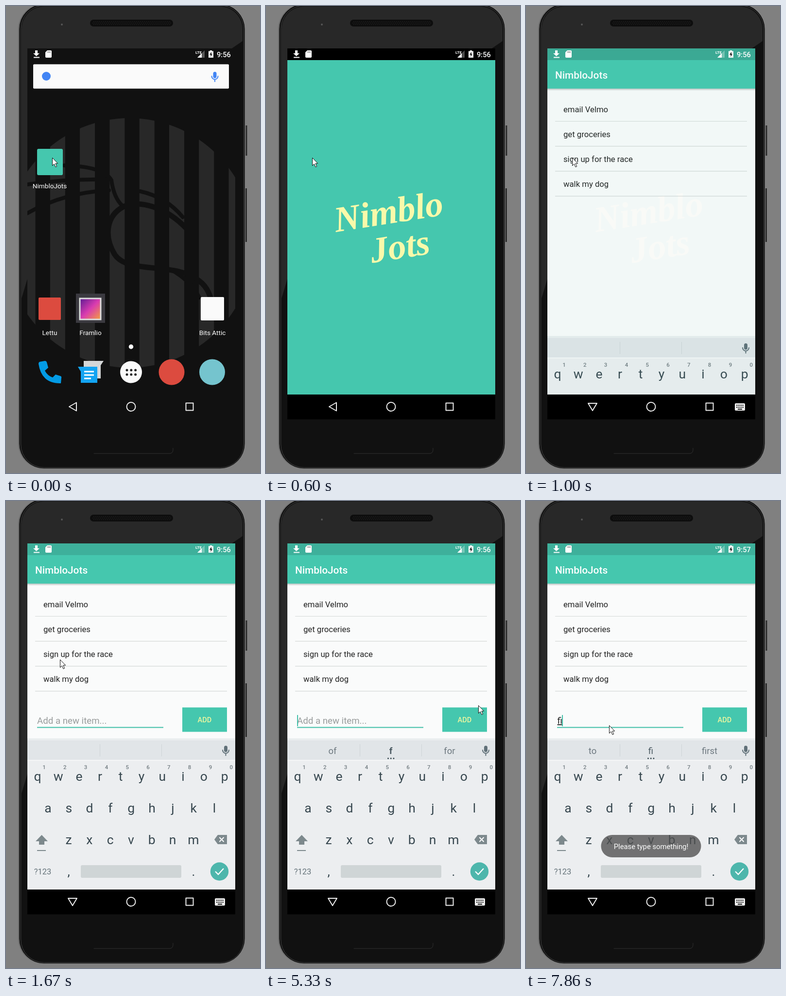
Recreate the animation shown at these times as an HTML page. Size 523 by 958 pixels, loop 7990 ms.

```html
<!DOCTYPE html>
<html lang="en">
<head>
<meta charset="utf-8">
<title>To-do app demo</title>
<style>
  html, body { margin: 0; width: 100%; height: 100%; overflow: hidden; background: #808080; }
  svg { display: block; width: 100vw; height: 100vh; font-family: Roboto, sans-serif; }
  .mid { text-anchor: middle; }
  .medium { font-weight: 500; }
  .line { fill: none; stroke-linecap: round; stroke-linejoin: round; }
  .label { font-size: 13.6px; fill: #fff; text-anchor: middle; }
  .item { font-size: 16.7px; fill: #222; }
  .key { font-size: 26.5px; fill: #37474f; text-anchor: middle; }
  .digit { font-size: 11.5px; font-weight: 500; fill: #737d82; text-anchor: middle; }
  .hint { font-size: 18.5px; fill: #6e7980; text-anchor: middle; }
  .script { font: italic bold 74px "Liberation Serif", serif; fill: #f9f9aa; text-anchor: middle; }
</style>
</head>
<body>
<svg viewBox="0 0 523 958">
  <defs>
    <clipPath id="screenClip"><path d="M44 87H472V848H44Z"/></clipPath>
    <clipPath id="contentClip"><path d="M44 87H472V797H44Z"/></clipPath>
    <clipPath id="discClip"><circle cx="254" cy="486" r="256"/></clipPath>
    <clipPath id="bodyClip"><rect x="32" y="1" width="455" height="944" rx="47"/></clipPath>
    <linearGradient id="shade" x2="0" y2="1">
      <stop stop-color="#000" stop-opacity=".22"/><stop offset="1" stop-color="#000" stop-opacity="0"/>
    </linearGradient>
    <linearGradient id="photo" x2="1" y2="1">
      <stop stop-color="#5b1a92"/><stop offset=".5" stop-color="#d93bb0"/><stop offset="1" stop-color="#f5a13a"/>
    </linearGradient>
    <g id="mic">
      <rect x="-3.5" y="-10" width="7" height="13" rx="3.5"/>
      <path class="line" d="M-6.5-1A6.5 6.5 0 0 0 6.5-1M0 6V10" stroke="currentColor" stroke-width="2"/>
    </g>
  </defs>

  <g id="phone">
    <rect x="25" y="-4" width="467" height="953" rx="52" fill="#696969"/>
    <rect x="28" y="-3" width="463" height="951" rx="50" fill="#111" stroke="#050505"/>
    <rect x="30.500" y="-1" width="459" height="948" rx="48" fill="none" stroke="#444"/>
    <g clip-path="url(#bodyClip)">
      <path d="M32 0H487V72L465 87H44V560L32 600Z" fill="#282828"/>
    </g>
    <path d="M495 245V307M494.500 374V484" stroke="#2b2b2b" stroke-width="3"/>
    <rect x="173" y="28" width="171" height="14" rx="7" fill="#0d0d0d"/>
    <path d="M180 32H338M178 35H340M180 38H338" stroke="#292929" stroke-dasharray="2 2"/>
    <circle cx="115" cy="38" r="2" fill="#555"/>
    <path class="line" d="M181 918H338Q345 917 344 907" stroke="#303030"/>
  </g>

  <g id="home" clip-path="url(#screenClip)">
    <path d="M44 87H472V848H44Z" fill="#111"/>
    <g clip-path="url(#discClip)">
      <g id="stripes" fill="#282828"></g>
      <g class="line" stroke="#111" stroke-width="11">
        <path d="M372 457C330 413 276 397 243 411C202 432 204 478 224 510C251 551 350 524 398 564Q422 582 425 620"/>
        <path d="M44 425Q118 383 212 378M44 366Q130 354 208 356M120 327Q200 329 217 357Q222 394 240 410M276 380Q330 392 364 433M340 541Q382 565 398 598" stroke-width="8"/>
      </g>
    </g>
    <rect x="56" y="119.500" width="403" height="50" rx="2" fill="#fafafa"/>
    <circle cx="83" cy="144" r="9" fill="#4285f4"/>
    <use href="#mic" x="430" y="145" fill="#4285f4" color="#4285f4"/>
    <rect x="64" y="293" width="53" height="54" rx="3" fill="#45c7ae"/>
    <rect x="67" y="598" width="46" height="46" rx="2" fill="#dc4b3f"/>
    <rect x="144" y="590" width="60" height="60" fill="#3b3a40"/>
    <rect x="152" y="600" width="43" height="43" fill="url(#photo)" stroke="#ddd" stroke-width="3"/>
    <rect x="401" y="597" width="48" height="48" rx="2" fill="#fafafa"/>
    <circle cx="341" cy="751" r="26.500" fill="#dc4b3f"/>
    <circle cx="424.500" cy="751" r="26.500" fill="#75c4ce"/>
    <path d="M69 730L80 728Q83 728 84 731L87 742L80 748Q85 758 96 762L102 756L112 759Q115 760 114 763L113 774Q73 775 67 734Q67 731 69 730Z" fill="#039be5"/>
    <path d="M160 728H201L195 737V764H160Z" fill="#d5d7d8"/>
    <path d="M148 740H188V773H154V750Z" fill="#13a4f2"/>
    <path d="M161 750H181M161 757H181M161 764H175" stroke="#fff" stroke-width="3"/>
    <circle cx="257.500" cy="751" r="22.500" fill="#fafafa"/>
    <path class="line" d="M249 747H267M249 756H267" stroke="#222" stroke-width="5" stroke-dasharray="0 8.800"/>
    <circle cx="257.500" cy="699" r="4.700" fill="#fff"/>
    <text class="label" x="90" y="374">NimbloJots</text>
    <text class="label" x="90" y="675">Lettu</text>
    <text class="label" x="174" y="675">Framlio</text>
    <text class="label" x="425" y="675">Bits Attic</text>
  </g>

  <g clip-path="url(#screenClip)">
    <g id="splash">
      <path d="M44 87H472V848H44Z"/>
      <path d="M44 111H472V797H44Z" fill="#45c7ae"/>
      <g class="script" transform="rotate(-9 258 460)">
        <text x="258" y="446">Nimblo</text>
        <text x="270" y="520">Jots</text>
      </g>
    </g>
  </g>

  <g id="app" clip-path="url(#contentClip)">
    <path d="M44 87H472V797H44Z" fill="#fafbfb"/>
    <path d="M44 87H472V111H44Z" fill="#3eb09b"/>
    <path d="M44 111H472V169.500H44Z" fill="#45c7ae"/>
    <path d="M44 169.500H472V174H44Z" fill="url(#shade)"/>
    <text class="medium" x="60" y="148.500" font-size="20.800" fill="#fff">NimbloJots</text>
    <g id="items"></g>
    <g id="entry">
      <text id="placeholder" x="64" y="457" font-size="18.700" fill="#999c9c">Add a new item...</text>
      <text id="typed" x="64.500" y="457" font-size="18.700" fill="#222" text-decoration="underline"></text>
      <path d="M64 464.500H324" stroke="#42bfa8" stroke-width="2"/>
      <rect id="caret" y="439" width="2" height="23" fill="#42bfa8"/>
      <path d="M363 423.500H455V473.500H363Z" fill="#45c7ae"/>
      <text class="mid medium" x="409" y="454" font-size="14.600" fill="#eef7a0">ADD</text>
    </g>
    <g id="keyboard">
      <path d="M44 487H472V491H44Z" fill="#e9edee"/>
      <path d="M44 490H472V797H44Z" fill="#eceef0"/>
      <path d="M44 491H472V531H44Z" fill="#e1e5e8"/>
      <path d="M193.500 499V524M320.500 499V524" stroke="#cdd3d6"/>
      <path d="M44 532H472" stroke="#f5f6f7" stroke-width="2"/>
      <g id="hints">
        <text class="hint" x="137" y="519"></text>
        <text class="hint" x="257" y="519" style="fill:#4b5a62"></text>
        <text class="hint" x="378" y="519"></text>
        <path id="dots" class="line" d="M251.500 528H264" stroke="#37474f" stroke-width="3" stroke-dasharray="0 5.700"/>
      </g>
      <use href="#mic" x="452.500" y="512" fill="#607078" color="#607078"/>
      <g id="keys"></g>
      <path d="M73.500 685L86 698H79V705H68V698H61ZM64 716H82V718H64Z" fill="#7d898d"/>
      <path d="M429 694.500L436 685H455V704H436Z" fill="#7d898d"/>
      <path class="line" d="M440 690.500L448 698.500M448 690.500L440 698.500" stroke="#fff" stroke-width="2"/>
      <text class="mid" x="75.500" y="766" font-size="16.500" fill="#66747b">?123</text>
      <rect x="154" y="747" width="207" height="26" rx="3" fill="#cfd5d6"/>
      <circle cx="439.500" cy="760" r="18.700" fill="#4db6ac"/>
      <path d="M431 760L437 766L448 754" fill="none" stroke="#fff" stroke-width="2.300"/>
    </g>
    <g id="toast">
      <rect x="154.500" y="685" width="206" height="46" rx="23" fill="#505050" fill-opacity=".82"/>
      <text class="mid" x="257.500" y="714" font-size="14.800" fill="#fff">Please type something!</text>
    </g>
  </g>

  <g id="statusIcons" fill="#fff">
    <path d="M60 91H65V97H69L62.500 103L56 97H60ZM57 104.500H69V106.500H57Z"/>
    <path d="M85 91H92Q94 91 94 93V104Q94 106 92 106H83Q81 106 81 104V95Z"/>
    <path d="M86 93V96M88.500 93V96M91 93V96" stroke="#555"/>
    <text x="390" y="98" font-size="8" font-weight="700">LTE</text>
    <path d="M409 91V106H394Z" opacity=".3"/>
    <path d="M403 97V106H394Z"/>
    <path d="M420 91H424V92.500H427V106H417V92.500H420Z"/>
    <path d="M423 94L419 100H421.500V104.500L425 98.500H423Z" fill="#222"/>
    <text id="clock" class="medium" x="434" y="104.500" font-size="14.600"></text>
  </g>

  <g class="line" stroke="#eee" stroke-width="2">
    <path id="back"/>
    <circle cx="257.500" cy="822" r="9"/>
    <path d="M370.500 814.500H385.500V829.500H370.500Z"/>
  </g>
  <g id="imeIcon">
    <rect x="430" y="815" width="21" height="15" rx="2" fill="#eee"/>
    <path d="M433 819H449M433 823H449" stroke="#111" stroke-width="2" stroke-dasharray="2 1.200"/>
    <path d="M436 827H445" stroke="#111" stroke-width="2"/>
  </g>
  <path id="pointer" d="M.5.5V16.500L4.200 13L7 19.300L9.600 18.200L6.900 12H11.700Z" fill="#fff" stroke="#111"/>
</svg>

<script>
const LOOP = 7990;
const ui = Object.fromEntries([...document.querySelectorAll('[id]')].map(el => [el.id, el]));

// Each track lists [start time, ...value]; a value holds until the next start.
const tracks = {
  pointer: [[0, 95, 311], [1670, 111, 325], [1790, 128, 345], [1910, 150, 372], [2030, 172, 398],
    [2150, 190, 418], [2270, 198, 428], [4800, 173, 424], [4940, 205, 420], [5060, 242, 445],
    [5210, 340, 425], [5330, 437, 419], [5480, 425, 441], [5610, 414, 430], [5760, 423, 431],
    [6060, 423, 440], [6450, 356, 452], [6600, 260, 458], [6720, 170, 461], [6870, 171, 460]],
  splash: [[0, 0, 60], [120, .25, 40], [240, .7, 14], [360, .96, 2], [480, 1, 0]],
  app: [[0, 0], [850, .757], [1000, .96], [1120, 1]],
  keyboard: [[0, 310], [1000, 190], [1120, 35], [1240, 0]],
  entry: [[0, 307], [1120, 0]],
  caret: [[0, 1], [1670, 0], [1910, 1], [2270, 0], [2860, 1], [3230, 0], [3510, 1], [5210, 0],
    [5330, 1], [5910, 0], [6300, 1], [6870, 0], [7430, 1]],
  typed: [[0, ''], [3510, 'f'], [3660, 'fi'], [4210, 'f'], [4800, ''], [7710, 'f'], [7860, 'fi']],
  hints: [[0, '', '', ''], [3660, 'of', 'f', 'for'], [3780, 'to', 'fi', 'first'],
    [4360, 'of', 'f', 'for'], [7860, 'to', 'fi', 'first']],
  toast: [[0, 0], [5910, .25], [6060, .65], [6180, .9], [6300, 1], [7860, .96]],
};
const at = (name, t) => tracks[name].findLast(([start]) => start <= t).slice(1);
const show = (el, visible) => el.style.display = visible ? '' : 'none';
const shift = (el, x, y) => el.setAttribute('transform', `translate(${x} ${y})`);
const text = (cls, x, y, s) => `<text class="${cls}" x="${x}" y="${y}">${s}</text>`;

for (let i = 0; i < 8; i++)
  ui.stripes.innerHTML += `<rect x="${29.5 + i * 61.3}" y="220" width="31" height="530"/>`;

['email Velmo', 'get groceries', 'sign up for the race', 'walk my dog'].forEach((item, i) => {
  const y = 217.5 + i * 51.2;
  ui.items.innerHTML += text('item', 77, y, item) +
    `<path d="M60 ${y + 19}H455" stroke="#d5d9d8" stroke-width="1.2"/>`;
});

[['qwertyuiop', 65, 574], ['asdfghjkl', 86.5, 639], ['zxcvbnm', 129, 704]].forEach(([row, x, y], r) =>
  [...row].forEach((key, i) => {
    const dx = i * 42.8;
    ui.keys.innerHTML += text('key', x + dx, y, key) +
      (r ? '' : text('digit', x + 13.5 + dx, 550, (i + 1) % 10));
  }));
ui.keys.innerHTML += text('key', 129, 769, ',') + text('key', 386, 769, '.');

function draw(t) {
  shift(ui.pointer, ...at('pointer', t));
  const [splashAlpha, splashY] = at('splash', t);
  ui.splash.style.opacity = splashAlpha;
  shift(ui.splash, 0, splashY);
  show(ui.home, t < 480);

  const [appAlpha] = at('app', t);
  ui.app.style.opacity = appAlpha;
  const open = appAlpha > 0;
  show(ui.imeIcon, open);
  ui.back.setAttribute('d', open ? 'M128 815H146L137 830Z' : 'M145 813.500V830.500L130 822Z');
  shift(ui.keyboard, 0, at('keyboard', t)[0]);
  shift(ui.entry, 0, at('entry', t)[0]);

  const [typed] = at('typed', t);
  ui.typed.textContent = typed;
  show(ui.placeholder, !typed);
  ui.caret.setAttribute('x', 64 + [0, 6, 10][typed.length]);
  show(ui.caret, at('caret', t)[0]);

  const hints = at('hints', t);
  const words = ui.hints.querySelectorAll('text');
  words.forEach((word, i) => word.textContent = hints[i]);
  words[1].style.fontWeight = hints[1] === 'f' ? 700 : 400;
  show(ui.dots, hints[1]);

  ui.toast.style.opacity = at('toast', t)[0];
  ui.clock.textContent = t < 6600 ? '9:56' : '9:57';
}

let began;
function tick(now) {
  began ??= now;
  draw((now - began) % LOOP);
  requestAnimationFrame(tick);
}
draw(0);
requestAnimationFrame(tick);
</script>
</body>
</html>
```
